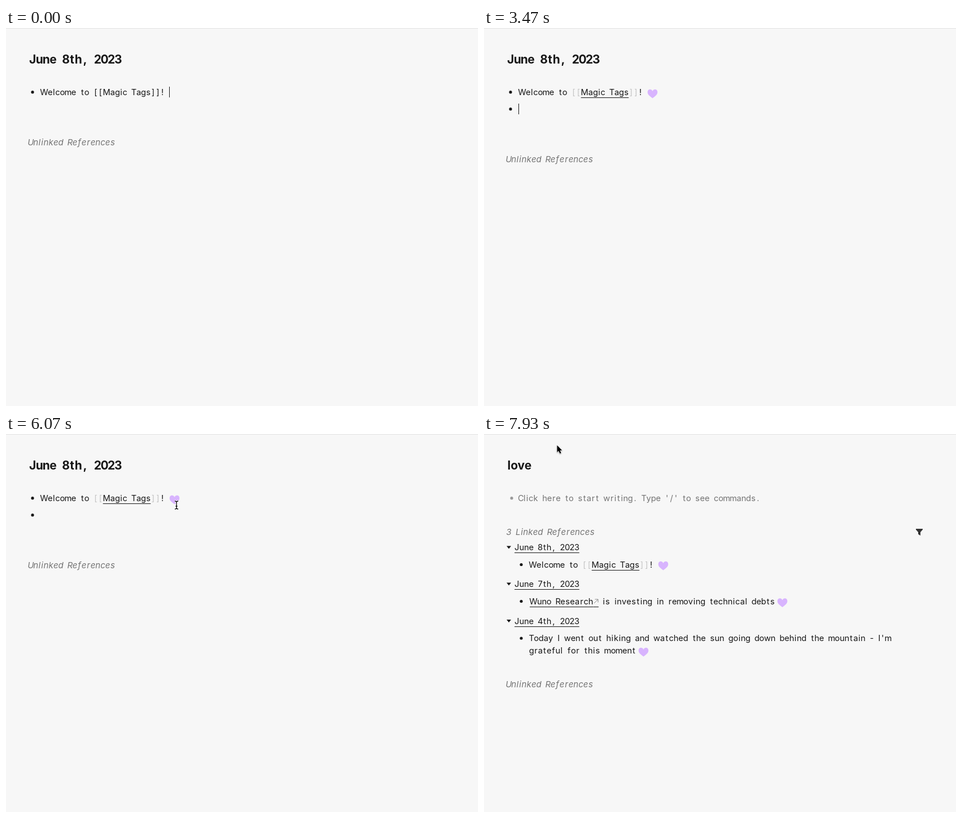
An HTML page with a canvas for the animation above (8000 ms loop, 836 px wide and 670 px high).

```html
<!DOCTYPE html>
<html lang="en">
<head>
<meta charset="utf-8">
<title>Magic Tags</title>
<style>
html, body { margin: 0; width: 100%; height: 100%; overflow: hidden; background: #f7f7f7; }
canvas { display: block; }
</style>
</head>
<body>
<canvas id="stage" width="836" height="670"></canvas>
<script>
const ctx = document.getElementById('stage').getContext('2d');
const LOOP = 8000;
const INK = '#171717', GRAY = '#757575', FAINT = '#c4c4c4', LILAC = '#d8b4fe';

// Near-monospaced rhythm: each class of character has its own advance at 15px.
function advance(ch) {
  if ('MW'.includes(ch)) return 13;
  if ('mw'.includes(ch)) return 11.7;
  if ('ilI'.includes(ch)) return 4.7;
  if ('.,'.includes(ch)) return 8;
  if (" '!-".includes(ch)) return 7.4;
  if ('rtf'.includes(ch)) return 7;
  return 8.5;
}

// Draws a run of text and returns the x where it ends.
function write(text, x, y, color = INK, style = '', size = 15) {
  ctx.font = `${style} ${size * 0.98}px Inter, sans-serif`;
  ctx.fillStyle = color;
  ctx.textAlign = 'center';
  for (const ch of text) {
    const width = advance(ch) * size / 15;
    ctx.fillText(ch, x + width / 2, y);
    x += width;
  }
  return x;
}

function rect(x, y, w, h, color) {
  ctx.fillStyle = color;
  ctx.fillRect(x, y, w, h);
}

function link(text, x, y) {
  const end = write(text, x, y);
  rect(x, Math.round(y + 4), end - x, 1, INK);
  return end;
}

function dot(x, y, color = INK) {
  ctx.fillStyle = color;
  ctx.beginPath();
  ctx.arc(x, y, 2.6, 0, 2 * Math.PI);
  ctx.fill();
}

function shape(path, x, y, fill, stroke, lineWidth = 1) {
  ctx.save();
  ctx.translate(x, y);
  const outline = new Path2D(path);
  if (stroke) {
    ctx.strokeStyle = stroke;
    ctx.lineWidth = lineWidth;
    ctx.lineJoin = 'round';
    ctx.stroke(outline);
  }
  if (fill) {
    ctx.fillStyle = fill;
    ctx.fill(outline);
  }
  ctx.restore();
}

const heart = (x, y) => shape(
  'M0 8C-3 5.6-8.8 2-8.8-2.8C-8.8-8.6-2-9.2 0-4.6C2-9.2 8.8-8.6 8.8-2.8C8.8 2 3 5.6 0 8Z', x, y, LILAC);

const title = text => write(text, 41, 63, INK, 'bold', 21.4);
const heading = (text, y) => write(text, 39.5, y, GRAY, 'italic', 15.4);
const caret = (x, y) => rect(Math.round(x), y, 1, 19, INK);

function welcome(x, y) {
  x = write('Welcome to ', x, y);
  x = write('[[', x, y, FAINT);
  x = link('Magic Tags', x, y);
  x = write(']]', x, y, FAINT);
  write('!', x, y);
}

function popup() {
  ctx.save();
  ctx.shadowColor = 'rgba(0,0,0,.16)';
  ctx.shadowBlur = 10;
  ctx.shadowOffsetX = 3;
  ctx.shadowOffsetY = 3;
  ctx.beginPath();
  ctx.roundRect(298.5, 127.5, 386, 39, 4);
  ctx.fillStyle = '#ebebeb';
  ctx.fill();
  ctx.restore();
  ctx.strokeStyle = '#d9d9d9';
  ctx.lineWidth = 1;
  ctx.stroke();
  ctx.font = '13.4px "Liberation Sans", Arial, sans-serif';
  ctx.fillStyle = INK;
  ctx.textAlign = 'left';
  ctx.fillText('love', 309, 152);
}

function typingPage(t) {
  title('June 8th, 2023');
  dot(47, 113.7);
  const typed = [1070, 1470, 1670, 1800, 1930].filter(at => t >= at).length;
  const end = write('Welcome to [[Magic Tags]]! ' + '#love'.slice(0, typed), 61, 119);
  const hidden = (t >= 270 && t < 800) || (t >= 2470 && t < 2600) || t >= 3130;
  if (!hidden) caret(end + 1.2, 104);
  heading('Unlinked References', 207.5);
  if (t >= 1470 && t < 2600) popup();
}

function taggedPage(t) {
  title('June 8th, 2023');
  dot(47, 113.7);
  welcome(61, 119);
  heart(298.5, 116.5);
  dot(47, 143.7);
  if ((t - 3470) % 1000 < 460) caret(61, 134);
  heading('Unlinked References', 237.5);
}

function day(date, y) {
  shape('M-4-2.5H4L0 2.5Z', 44, y - 5, INK);
  link(date, 54, y);
  dot(66, y + 25.5);
}

function lovePage() {
  title('love');
  dot(49, 113.7, '#999');
  write("Click here to start writing. Type '/' to see commands.", 61, 119, GRAY);
  heading('3 Linked References', 179);
  shape('M-6-6H6V-4.5L2 0V6L-2 3.5V0L-6-4.5Z', 771, 174, '#333');

  day('June 8th, 2023', 206);
  welcome(80, 236.5);
  heart(317.5, 233.5);

  day('June 7th, 2023', 271);
  const end = link('Wuno Research', 81, 302);
  rect(end, 306, 203 - end, 1, INK);
  shape('M195 300L202 293M196.5 293H202V298.5', 0, 0, null, '#888');
  write('is investing in removing technical debts', 210, 302);
  heart(528.5, 299);

  day('June 4th, 2023', 336.5);
  write("Today I went out hiking and watched the sun going down behind the mountain - I'm", 80, 367);
  write('grateful for this moment', 80, 389);
  heart(282.5, 386.5);
  heading('Unlinked References', 448.5);
}

const pointers = {
  arrow(x, y) {
    ctx.save();
    ctx.shadowColor = 'rgba(0,0,0,.25)';
    ctx.shadowBlur = 2;
    ctx.shadowOffsetY = 1;
    shape('M0 0V12.3L2.7 9.8L4.9 14.6L7.1 13.7L5 9H8.7Z', x, y, '#000', '#fff', 1.4);
    ctx.restore();
  },
  beam(x, y) {
    const path = 'M-3-7Q0-7 0-5Q0-7 3-7M0-5V5M-3 7Q0 7 0 5Q0 7 3 7M-1.5 2H1.5';
    shape(path, x, y, null, '#fff', 3);
    shape(path, x, y, null, '#000', 1.3);
  },
  hand(x, y) {
    shape('M-3 1V-6Q-3-7.5-1.8-7.5Q-.6-7.5-.6-6V-2Q.2-3.2 1.7-2.2Q2.8-3 4-1.6Q6.2-2 6.2.5V3Q6 5 5 7H-2Q-3.3 4.5-5.5 2Q-6.7 0-5-.3Q-4 0-3 1Z',
      x, y, '#fff', '#000', 2);
    shape('M-.4 2V5M1.7 2V5M3.7 2V5', x, y, null, '#000', 0.9);
  }
};

const MOUSE = [
  [4730, 446, 640], [4930, 387, 553], [5070, 360, 503], [5270, 360, 503],
  [6070, 302, 126], [6200, 302, 126], [6270, 304, 132], [6330, 301.5, 125],
  [7130, 301.5, 125]
];
const EXIT = [[7800, 292, 106], [7930, 129.5, 20], [8000, 129.5, 20]];

const easeInOut = u => u * u * (3 - 2 * u);

function along(path, t) {
  const i = path.findIndex(([at], n) => n && t < at);
  const [t0, x0, y0] = path[i - 1], [t1, x1, y1] = path[i];
  let u = (t - t0) / (t1 - t0);
  if (t1 - t0 > 500) u = easeInOut(u);
  return [x0 + (x1 - x0) * u, y0 + (y1 - y0) * u];
}

function mouse(t) {
  if (t >= 7800) pointers.arrow(...along(EXIT, t));
  if (t < 4730 || t >= 7130) return;
  const [x, y] = along(MOUSE, t);
  const kind = t >= 6330 ? 'hand' : y < 160 ? 'beam' : 'arrow';
  pointers[kind](x, y);
}

function ripple(t) {
  if (t < 6730 || t >= 7070) return;
  const u = Math.min(1, (t - 6730) / 240);
  ctx.beginPath();
  ctx.arc(299, 116.5, 14 + 15.5 * (1 - (1 - u) ** 2), 0, 2 * Math.PI);
  ctx.strokeStyle = '#000';
  ctx.lineWidth = 1.5;
  ctx.stroke();
}

function draw(now) {
  const t = now % LOOP;
  rect(0, 0, 836, 670, '#f7f7f7');
  rect(0, 0, 836, 1, '#e2e2e2');
  if (t < 3470) typingPage(t);
  else if (t < 7130) taggedPage(t);
  else lovePage();
  ripple(t);
  mouse(t);
}

const start = performance.now();
function frame() {
  draw(performance.now() - start);
  requestAnimationFrame(frame);
}
frame();
</script>
</body>
</html>
```
